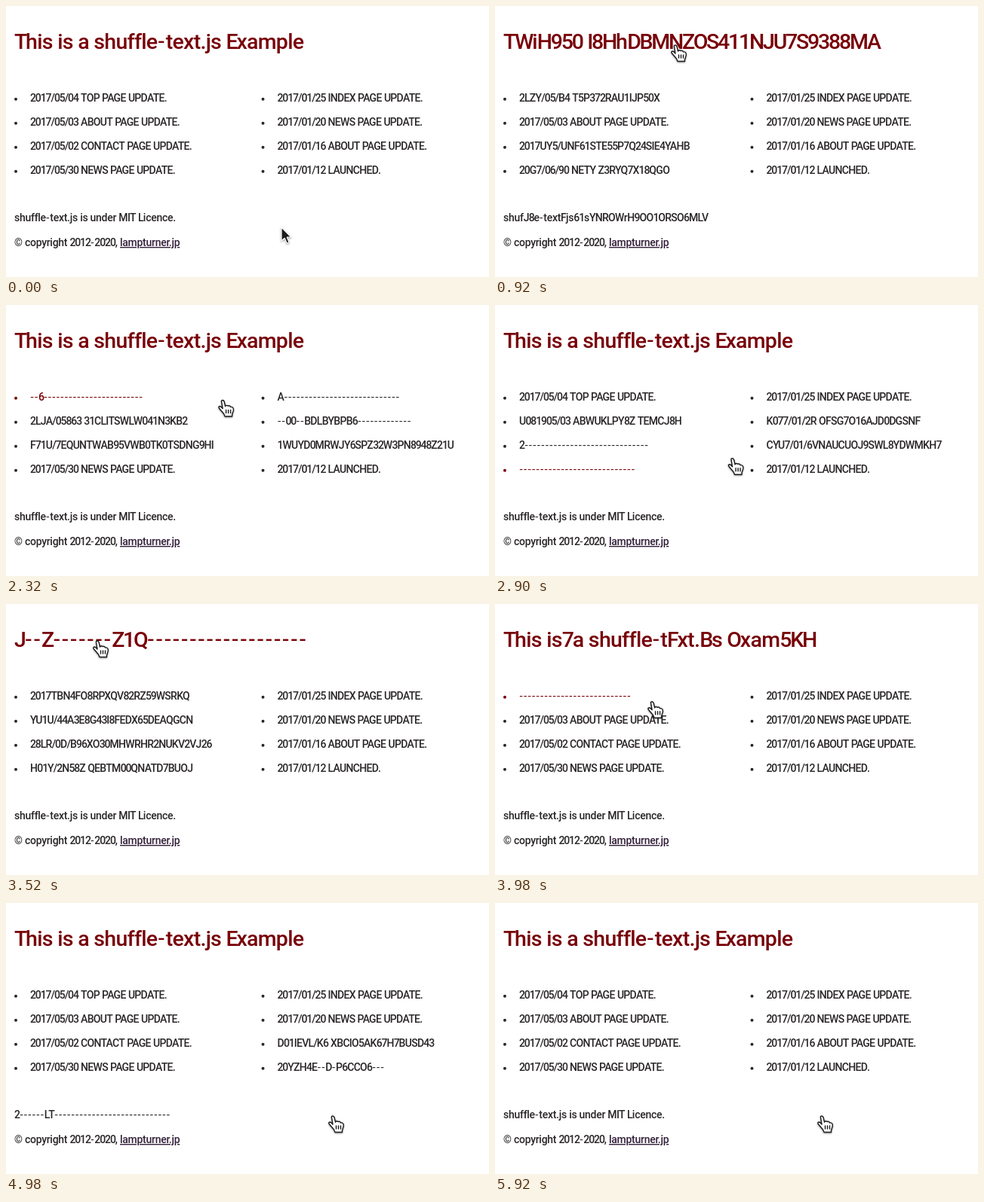
An HTML page that plays this animation: 640 by 360 pixels, repeating every 5.94 s.

```html
<!DOCTYPE html>
<html lang="en">
<head>
<meta charset="utf-8">
<title>Shuffle text</title>
<style>
html, body { margin: 0; width: 100%; height: 100%; overflow: hidden; background: #fff; }
svg { display: block; width: 640px; height: 360px; }
text { font: 500 14px Roboto, "Liberation Sans", sans-serif; letter-spacing: -.02em; white-space: pre; fill: #2a2628; }
.title { font-size: 28.5px; letter-spacing: -.025em; fill: #780008; }
.digits { letter-spacing: -.078em; }
.caps { letter-spacing: -.05em; }
.title .caps { letter-spacing: -.078em; }
.dashes { font-family: Lato, sans-serif; letter-spacing: .02em; }
.link { fill: #33203a; text-decoration: underline; }
circle { fill: #2a2628; }
.hover text, .hover circle { fill: #780008; }
</style>
</head>
<body>
<svg viewBox="0 0 640 360">
  <g id="lines"></g>
  <g id="cursor" stroke-linejoin="round" style="filter: drop-shadow(0 1px 1px #0006)">
    <path id="arrow" fill="#1c1a1c" stroke="#fff" stroke-width="1.2"
      d="M0 0V18L4.2 14.3 7.2 21.2 10.2 19.9 7.3 13.2H12.8Z"/>
    <g id="hand" transform="translate(1.5 0)" fill="#fff" stroke="#1c1a1c" stroke-width="1.4" stroke-linecap="round">
      <path d="M-2 2Q-2.5 0-.5 0Q1 0 1.6 2L3 8Q4.5 6 6.5 7.5Q9 6.5 10 9Q12.5 8.5 13.5 10.5Q14.5 13 13 16L12 19V21.5H2.5L1 18-4.5 11.5Q-7 8.5-4.5 8Q-2.5 8-.5 11Z"/>
      <path d="M4 13v4M7 13v4M10 13v4"/>
    </g>
  </g>
</svg>
<script>
const LOOP = 5940, STEP = 20, DURATION = 600;
const ROW_TOP = 106, ROW_HEIGHT = 32, COLUMN_EDGE = 328;
const GLYPHS = 'ABCDEFGHIJKLMNOPQRSTUVWXYZ1234567890';
const $ = id => document.getElementById(id);

const lines = {};
const addLine = (id, text, x, y, kind = '') => {
  lines[id] = { text, x, y, kind, starts: [] };
};
const addList = (column, x, items) => items.forEach((text, row) =>
  addLine(column + row, text, x, ROW_TOP + 21 + row * ROW_HEIGHT, 'item'));

addLine('title', 'This is a shuffle-text.js Example', 11, 57, 'title');
addList('left', 32, ['2017/05/04 TOP PAGE UPDATE.', '2017/05/03 ABOUT PAGE UPDATE.',
  '2017/05/02 CONTACT PAGE UPDATE.', '2017/05/30 NEWS PAGE UPDATE.']);
addList('right', 359.5, ['2017/01/25 INDEX PAGE UPDATE.', '2017/01/20 NEWS PAGE UPDATE.',
  '2017/01/16 ABOUT PAGE UPDATE.', '2017/01/12 LAUNCHED.']);
addLine('licence', 'shuffle-text.js is under MIT Licence.', 11, 286);
addLine('copyright', '© copyright 2012-2020, ', 11, 319);
addLine('link', 'lampturner.jp', 151, 319, 'link');

// Turning points of the pointer: time, x, y
const turns = [
  [0, 365, 294], [500, 365, 294], [700, 238, 52], [1000, 238, 52], [1400, 185, 88],
  [1520, 165, 56], [1640, 139, 176], [1960, 178, 186], [2050, 205, 158], [2110, 345, 190],
  [2225, 405, 146], [2330, 283, 126], [2700, 380, 185], [3210, 185, 240], [3340, 150, 90],
  [3480, 120, 49], [3850, 120, 49], [4140, 326, 240], [4200, 410, 146], [4320, 250, 120],
  [4400, 178, 245], [4550, 300, 283], [4720, 420, 185], [4950, 432, 283], [LOOP, 432, 283]
];

function pointerAt(t) {
  const next = turns.findIndex(turn => turn[0] > t);
  const [t0, x0, y0] = turns[next - 1], [t1, x1, y1] = turns[next];
  const u = (t - t0) / (t1 - t0), ease = u * u * (3 - 2 * u);
  return [x0 + (x1 - x0) * ease, y0 + (y1 - y0) * ease];
}

function lineUnder([x, y]) {
  if (y > 25 && y < 68) return 'title';
  if (y > 271 && y < 290) return 'licence';
  const row = Math.floor((y - ROW_TOP) / ROW_HEIGHT);
  return row >= 0 && row < 4 ? (x < COLUMN_EDGE ? 'left' : 'right') + row : '';
}

// A line starts to shuffle whenever the pointer enters it.
for (let t = 0, last = ''; t < LOOP; t += STEP) {
  const id = lineUnder(pointerAt(t));
  if (id && id !== last) lines[id].starts.push(t);
  last = id;
}

function rand(...seeds) {
  let h = 9;
  for (const s of seeds) {
    h = Math.imul(h ^ (s + 1), 2246822519);
    h = Math.imul(h ^ (h >>> 15), 3266489917);
    h ^= h >>> 13;
  }
  return (h >>> 0) / 4294967296;
}

// Each character goes from dash to random glyph to its own letter, later ones later.
function textAt({ text, starts, y }, t) {
  const start = starts.filter(s => s <= t).pop(), progress = (t - start) / DURATION;
  if (start === undefined || progress >= 1) return text;
  return [...text].map((letter, i) => {
    const rate = i / text.length, settle = rate + rand(start, y, i) * (1 - rate);
    if (progress >= settle) return letter;
    if (progress < settle / 3) return '-';
    return GLYPHS[Math.floor(rand(start, y, i, t) * GLYPHS.length)];
  }).join('');
}

const runClass = run => run[0] === '-' ? 'dashes' : /[A-Z]/.test(run) ? 'caps' : 'digits';
const markRuns = text => text.replace(/[0-9\/]+|[A-Z]+|-+/g,
  run => `<tspan class="${runClass(run)}">${run}</tspan>`);

$('lines').innerHTML = Object.entries(lines).map(([id, { x, y, kind }]) =>
  `<g id="${id}">${kind === 'item' ? `<circle cx="${x - 19}" cy="${y - 3.2}" r="2"/>` : ''}` +
  `<text class="${kind}" x="${x}" y="${y}"></text></g>`).join('');

function draw(t) {
  const pointer = pointerAt(t), hovered = lineUnder(pointer);
  for (const [id, line] of Object.entries(lines)) {
    const shown = textAt(line, t), group = $(id);
    if (shown !== line.shown) group.lastChild.innerHTML = markRuns(line.shown = shown);
    group.classList.toggle('hover', id === hovered && line.kind === 'item');
  }
  $('hand').style.display = hovered ? '' : 'none';
  $('arrow').style.display = hovered ? 'none' : '';
  $('cursor').setAttribute('transform', `translate(${pointer})`);
}

const origin = performance.now();
function frame() {
  const t = (performance.now() - origin) % LOOP;
  draw(Math.floor(t / STEP) * STEP);
  requestAnimationFrame(frame);
}
frame();
</script>
</body>
</html>
```
